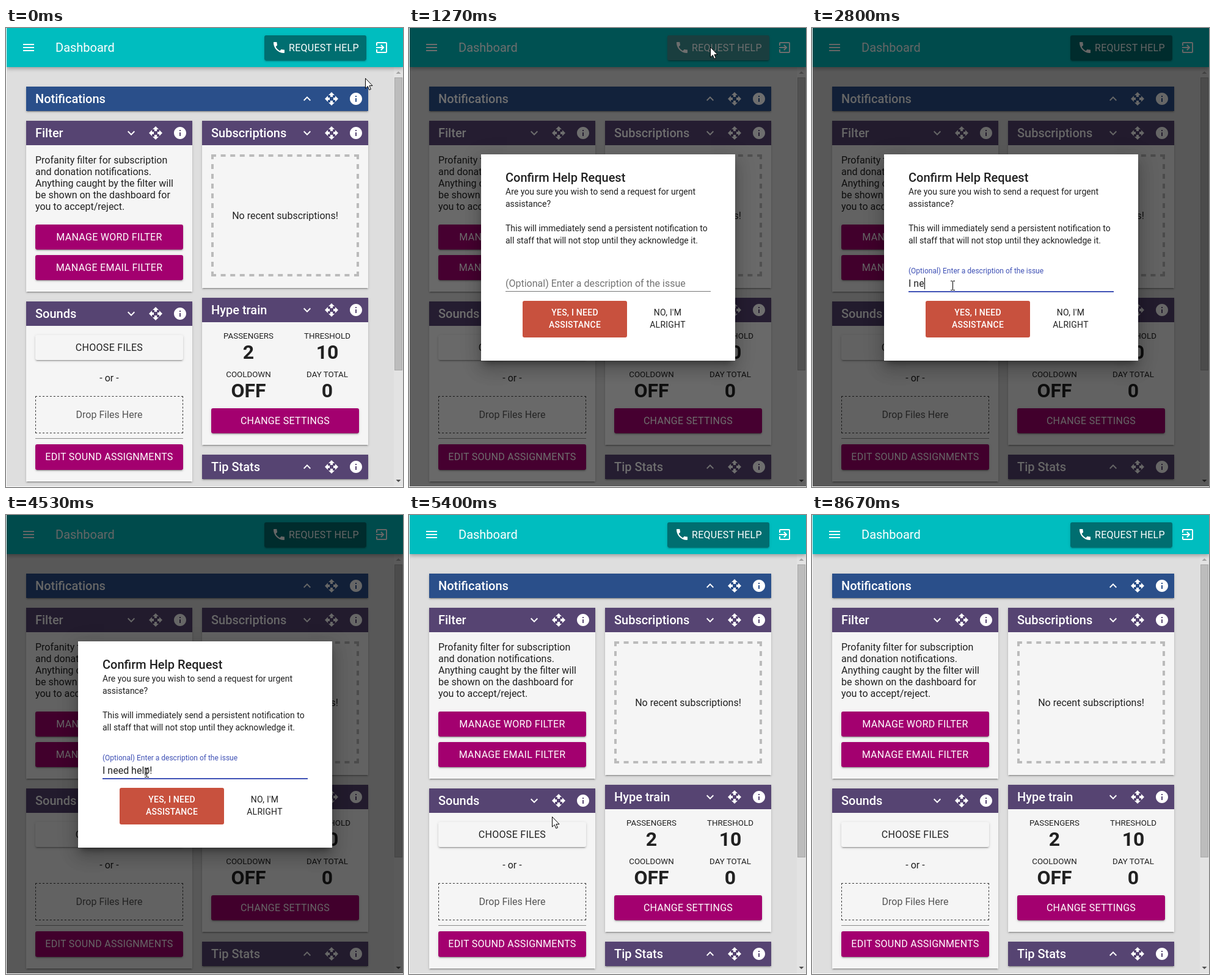
Recreate the animation shown at these times as an HTML page. Size 650 by 752 pixels, loop 8990 ms.

```html
<!DOCTYPE html>
<html lang="en">
<head>
<meta charset="utf-8">
<title>Dashboard help request</title>
<style>
html, body { margin: 0; width: 100%; height: 100%; overflow: hidden; background: #fff; }
#stage { position: relative; width: 650px; height: 752px; overflow: hidden; font-family: Roboto, sans-serif; }
#view { position: absolute; inset: 0; clip-path: inset(0 0 1px 1px); background: #dedede; }
#stage svg, .layer, .box { position: absolute; }
#stage svg, .layer { left: 0; top: 0; width: 650px; height: 752px; overflow: visible; }
text { white-space: pre; }
.upper { letter-spacing: .018em; }
.card { box-shadow: 0 2px 2px rgba(0,0,0,.14), 0 1px 5px rgba(0,0,0,.12), 0 3px 1px -2px rgba(0,0,0,.2); }
.button { border-radius: 3px; overflow: hidden; }
.bar { box-shadow: 0 3px 6px rgba(0,0,0,.28); }
.modal { box-shadow: 0 16px 24px 2px rgba(0,0,0,.14), 0 6px 30px 5px rgba(0,0,0,.12), 0 8px 10px -5px rgba(0,0,0,.4); }
.toast { border-radius: 2px; box-shadow: 0 2px 5px rgba(0,0,0,.26); }
#backdrop { background: #000; }
#ripple { position: absolute; border-radius: 50%; background: #fff; }
</style>
</head>
<body>
<div id="stage">
  <div id="view">
    <div class="layer" id="page"></div>
    <div class="layer" id="backdrop"></div>
    <div class="layer" id="dialog"></div>
    <div class="layer" id="toast"></div>
  </div>
  <svg id="pointer">
    <path id="arrow" d="M.5.5V17l3.8-3.6 2.5 6 2.6-1.1-2.5-5.8H12Z" fill="#fff" stroke="#000"/>
    <path id="hand" transform="translate(-6 0)" fill="#fff" stroke="#000" d="M4.5 13.5V2a1.6 1.6 0 0 1 3.2 0V8.5a1.5 1.5 0 0 1 2.9 0V9a1.5 1.5 0 0 1 2.9.3V9.8a1.5 1.5 0 0 1 2.9.5V15c0 2-1 3-1.6 4.5V21.5H6.5V19.5C5 17.5 2.5 15 .9 12.8 0 11 2.5 10 4.5 13.5Z"/>
    <path id="beam" fill="none" stroke="#000" d="M-3 -7.5h3m1 0h3M.5 -7V7M-3 7.5h3m1 0h3"/>
  </svg>
</div>
<script>
const LOOP = 8990, STEP = 1000 / 15;
const PURPLE = '#564472', BLUE = '#2a4f8a', PINK = '#a3006f', INK = '#212121', INDIGO = '#3f51b5';
const $ = id => document.getElementById(id);

const ICONS = {
  menu: 'M3 18h18v-2H3v2zm0-5h18v-2H3v2zm0-7v2h18V6H3z',
  phone: 'M6.62 10.79c1.44 2.83 3.76 5.14 6.59 6.59l2.2-2.2c.27-.27.67-.36 1.02-.24 1.12.37 2.33.57 3.57.57.55 0 1 .45 1 1V20c0 .55-.45 1-1 1-9.39 0-17-7.61-17-17 0-.55.45-1 1-1h3.5c.55 0 1 .45 1 1 0 1.25.2 2.45.57 3.57.11.35.03.74-.25 1.02l-2.2 2.2z',
  exit: 'M10.09 15.59L11.5 17l5-5-5-5-1.41 1.41L12.67 11H3v2h9.67l-2.58 2.59zM19 3H5c-1.11 0-2 .9-2 2v4h2V5h14v14H5v-4H3v4c0 1.1.89 2 2 2h14c1.1 0 2-.9 2-2V5c0-1.1-.9-2-2-2z',
  up: 'M12 8l-6 6 1.41 1.41L12 10.83l4.59 4.58L18 14z',
  down: 'M16.59 8.59L12 13.17 7.41 8.59 6 10l6 6 6-6z',
  move: 'M10 9h4V6h3l-5-5-5 5h3v3zm-1 1H6V7l-5 5 5 5v-3h3v-4zm14 2l-5-5v3h-3v4h3v3l5-5zm-9 3h-4v3H7l5 5 5-5h-3v-3z',
  info: 'M12 2C6.48 2 2 6.48 2 12s4.48 10 10 10 10-4.48 10-10S17.52 2 12 2zm1 15h-2v-6h2v6zm0-8h-2V7h2v2z'
};

// Builds one layer: boxes below, text and line art above.
function layer(id) {
  let boxes = '', art = '';
  const l = {
    box(x, y, w, h, color, cls = '', inner = '') {
      boxes += `<div class="box ${cls}" style="left:${x}px;top:${y}px;width:${w}px;height:${h}px;background:${color}">${inner}</div>`;
    },
    text(s, x, y, size = 16, color = INK, { mid, weight = 400, cls = '', name = '' } = {}) {
      art += `<text id="${name}" class="${cls}" x="${x}" y="${y}" font-size="${size}" font-weight="${weight}" fill="${color}" text-anchor="${mid ? 'middle' : 'start'}">${s}</text>`;
    },
    icon(name, cx, cy) {
      art += `<path transform="translate(${cx - 12} ${cy - 12})" fill="#fff" d="${ICONS[name]}"/>`;
    },
    art(s) { art += s; },
    dashed(x, y, w, h, line, color, dash) {
      const o = line / 2;
      const side = (x1, y1, x2, y2) => {
        const len = x2 - x1 + y2 - y1, n = Math.round((len - dash) / dash / 2);
        art += `<path d="M${x1} ${y1}L${x2} ${y2}" stroke="${color}" stroke-width="${line}" stroke-dasharray="${dash} ${(len - dash) / n - dash}"/>`;
      };
      side(x, y + o, x + w, y + o);
      side(x, y + h - o, x + w, y + h - o);
      side(x + o, y, x + o, y + h);
      side(x + w - o, y, x + w - o, y + h);
    },
    button(label, x, y, h, color = PINK, ink = '#fff') {
      l.box(x, y, 242, h, color, 'card button');
      l.text(label, x + 121, y + 26, 16, ink, { mid: true, cls: 'upper' });
    },
    card(title, x, y, w, h, color, arrow) {
      l.box(x, y, w, h, '#f5f5f5', 'card');
      l.box(x, y, w, 40, color);
      l.text(title, x + 15, y + 27, 20, '#fff', { weight: 500 });
      [arrow, 'move', 'info'].forEach((n, i) => l.icon(n, x + w - 100 + 40 * i, y + 20));
    },
    done() { $(id).innerHTML = boxes + `<svg>${art}</svg>`; }
  };
  return l;
}

function buildPage() {
  const p = layer('page');
  p.card('Notifications', 33, 96, 560, 40, BLUE, 'up');

  p.card('Filter', 33, 152, 272, 280, PURPLE, 'down');
  ['Profanity filter for subscription', 'and donation notifications.', 'Anything caught by the filter will',
    'be shown on the dashboard for', 'you to accept/reject.'].forEach((s, i) => p.text(s, 48, 222 + 19 * i));
  p.button('MANAGE WORD FILTER', 48, 322, 41);
  p.button('MANAGE EMAIL FILTER', 48, 371.5, 41);

  p.card('Sounds', 33, 448, 272, 295, PURPLE, 'down');
  p.button('CHOOSE FILES', 48, 503, 41, '#f5f5f5', INK);
  p.text('- or -', 169, 579, 16, INK, { mid: true });
  p.dashed(48, 603, 242, 61, 1, '#333', 3);
  p.text('Drop Files Here', 169, 639, 16, '#555', { mid: true });
  p.box(48, 672, 242, 1, '#8a8a8a');
  p.button('EDIT SOUND ASSIGNMENTS', 48, 682, 42);

  p.card('Subscriptions', 321, 152, 272, 274, PURPLE, 'down');
  p.dashed(336, 207, 242, 200, 4, '#bbb', 8);
  p.text('No recent subscriptions!', 457, 313, 16, INK, { mid: true });

  p.card('Hype train', 321, 442, 272, 241, PURPLE, 'down');
  [['PASSENGERS', '2', 397, 509], ['THRESHOLD', '10', 526, 509], ['COOLDOWN', 'OFF', 397, 572], ['DAY TOTAL', '0', 526, 572]]
    .forEach(([label, value, x, y]) => {
      p.text(label, x, y, 13.33, INK, { mid: true });
      p.text(value, x, y + 33, 32, INK, { mid: true, weight: 700 });
    });
  p.button('CHANGE SETTINGS', 336, 623, 41);

  p.card('Tip Stats', 321, 699, 272, 40, PURPLE, 'up');

  p.box(635, 64, 15, 688, '#e3e3e3');
  p.box(636, 81, 13, 480, '#a8a8a8');
  p.box(637, 82, 11, 478, '#bcbcbc');
  p.art('<path d="M638.5 75h8l-4-4z" fill="#a3a3a3"/><path d="M638.5 740h8l-4 4z" fill="#505050"/>');

  p.box(1, 0, 649, 64, '#00bdbf', 'bar');
  p.icon('menu', 37, 32);
  p.text('Dashboard', 81, 39, 20, '#fff');
  p.box(423, 12, 167, 41, '#006e70', 'card button', '<div id="ripple"></div>');
  p.icon('phone', 447, 32);
  p.text('REQUEST HELP', 463, 38, 16, '#fff', { cls: 'upper' });
  p.icon('exit', 615, 32);
  p.done();
}

function buildDialog() {
  const d = layer('dialog');
  d.box(118, 207, 416, 338, '#fff', 'modal');
  d.text('Confirm Help Request', 158, 252, 20, INK, { weight: 500 });
  [['Are you sure you wish to send a request for urgent', 273], ['assistance?', 293],
    ['This will immediately send a persistent notification to', 333],
    ['all staff that will not stop until they acknowledge it.', 353]].forEach(([s, y]) => d.text(s, 158, y, 14));
  d.text('(Optional) Enter a description of the issue', 0, 0, 16, '#737373', { name: 'label' });
  d.text('', 158, 424, 16, INK, { name: 'entry' });
  d.art(`<rect x="158" y="431" width="336" height="1" fill="#757575"/>
    <rect id="focus" y="431" height="2" fill="${INDIGO}"/>
    <rect id="caret" y="409" width="1" height="19" fill="#000"/>`);
  d.box(186, 447, 171, 60, '#c8513e', 'button');
  [['YES, I NEED', 271.5, 471, '#fff', 500], ['ASSISTANCE', 271.5, 491, '#fff', 500],
    ["NO, I'M", 423.5, 471, INK, 400], ['ALRIGHT', 423.5, 491, INK, 400]]
    .forEach(([s, x, y, c, weight]) => d.text(s, x, y, 14, c, { mid: true, weight, cls: 'upper' }));
  d.done();
}

function buildToast() {
  const t = layer('toast');
  t.box(13, 691, 288, 48, '#323232', 'toast');
  t.text('Help request sent!', 37, 720, 14, '#f1f1f1');
  t.done();
}

// Tables: step (1/15 s), then values, interpolated between rows.
const MOVES = [
  [7, 588, 82, 'arrow'], [10, 535, 51, 'hand'], [13, 493, 31, 'hand'], [17, 493, 31, 'arrow'],
  [21, 493, 31, 'arrow'], [26, 300, 300, 'arrow'], [29, 230, 422, 'beam'], [68, 230, 422, 'beam'],
  [70, 238, 465, 'hand'], [72, 241, 502, 'hand'], [74, 241, 502, 'hand'], [76, 234, 494, 'hand'],
  [79, 234, 494, 'arrow'], [93, 234, 494, 'arrow'], [95, 232, 507, 'hand'], [99, 230, 528, 'hand'],
  [103, 230, 528, 'hand'], [104, 212, 552, 'arrow'], [109, 66, 760, 'arrow']
];
const SHADE = [[16, 0], [17, .12], [18, .4], [19, .57], [20, .6], [78, .6], [79, .45], [80, .2], [81, 0]];
const RIPPLE = [[15, 0, .26], [16, 45, .26], [17, 87, .26], [18, 118, .26], [19, 140, .24], [28, 140, 0]];
const FLOAT = [[29, 0], [30, .35], [31, .75], [32, .94], [33, 1]];
const TOAST = [[84, 0], [85, .3], [86, .7], [87, .93], [88, 1], [128, 1], [129, .5], [130, 0]];
const MESSAGE = 'I need help!', KEYS = [37, 38, 40, 42, 44, 47, 49, 50, 51, 52, 55, 60];

function at(table, n) {
  let i = 0;
  while (i < table.length - 1 && table[i + 1][0] <= n) i++;
  const a = table[i], b = table[i + 1];
  if (!b || n <= a[0]) return a.slice(1);
  const k = (n - a[0]) / (b[0] - a[0]);
  return a.slice(1).map((v, j) => typeof v === 'number' ? v + (b[j + 1] - v) * k : v);
}
const show = (el, on) => { el.style.visibility = on ? 'visible' : 'hidden'; };

function draw(ms) {
  const n = Math.floor((ms + 4) / STEP);

  const [x, y, kind] = at(MOVES, n);
  $('pointer').style.transform = `translate(${Math.round(x)}px, ${Math.round(y)}px)`;
  for (const k of ['arrow', 'hand', 'beam']) show($(k), k === kind && n < 109);

  $('backdrop').style.opacity = at(SHADE, n)[0];
  show($('dialog'), n >= 17 && n < 79);

  const [r, fade] = at(RIPPLE, n);
  Object.assign($('ripple').style, {
    left: 74 - r + 'px', top: 24 - r + 'px', width: 2 * r + 'px', height: 2 * r + 'px', opacity: fade
  });

  const [f] = at(FLOAT, n);
  $('label').setAttribute('transform', `translate(158 ${424 - 22 * f}) scale(${1 - f / 4})`);
  $('label').setAttribute('fill', f ? INDIGO : '#737373');
  $('focus').setAttribute('x', 326 - 168 * f);
  $('focus').setAttribute('width', 336 * f);

  $('entry').textContent = MESSAGE.slice(0, KEYS.filter(k => k <= n).length);
  $('caret').setAttribute('x', Math.round(158 + $('entry').getComputedTextLength()));
  show($('caret'), (n >= 30 && n < 68) || (n >= 75 && n < 79));

  const [t] = at(TOAST, n);
  $('toast').style.opacity = t;
  $('toast').style.transform = n < 100 ? `translateY(${100 * (1 - t)}px)` : 'none';
}

buildPage();
buildDialog();
buildToast();
const start = performance.now();
function tick() {
  draw((performance.now() - start) % LOOP);
  requestAnimationFrame(tick);
}
tick();
</script>
</body>
</html>
```
